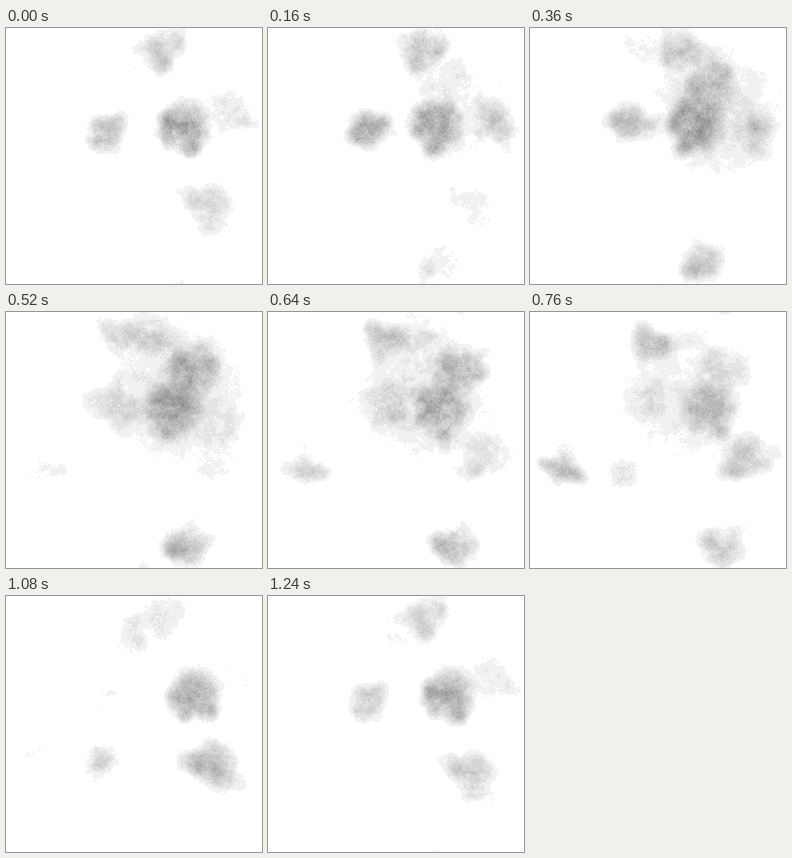
Write an HTML page with a canvas that moves like this. It is 256x256 px and loops after 1280 ms.

```html
<!DOCTYPE html>
<html>
<head>
<meta charset="utf-8">
<style>
  html, body { margin: 0; width: 100%; height: 100%; overflow: hidden; background: #fff; }
  canvas { display: block; width: 256px; height: 256px; }
</style>
</head>
<body>
<canvas id="stage" width="256" height="256"></canvas>
<script>
const SIZE = 256, LOOP = 1280, STEP = 40, SHADE = 14, WISPS = 5;

// Each cloud peaks at a moment, fades over its life and sways by dx, dy.
const clouds = [
  { at: 520, x: 172, y: 82, dx: -20, r: 85, d: 46 },
  { at: 40, life: 1300, x: 177, y: 97, dx: -12, r: 34, d: 108 },
  { at: 500, x: 184, y: 58, dx: 8, r: 34, d: 65 },
  { at: 200, life: 700, x: 152, y: 20, dx: -4, d: 75 },
  { at: 200, x: 98, y: 97, dy: -8, r: 24, d: 88 },
  { at: 640, life: 340, x: 117, y: 92, dy: -8, d: 35 },
  { at: 180, x: 224, y: 93, dy: 12, d: 52 },
  { at: 1000, life: 640, x: 210, y: 160, dx: -5, dy: 18, r: 32, d: 85 },
  { at: 560, life: 640, x: 182, y: 236, dx: 10, d: 70 },
  { at: 780, life: 400, x: 32, y: 158, dx: -8, r: 22, d: 72 },
  { at: 940, life: 300, x: 91, y: 164, r: 20, d: 75 },
  { at: 760, life: 620, x: 118, y: 32, dx: 6, dy: 8, r: 25, d: 58 }
];

const mix = (a, b, f) => a + (b - a) * f;
const ease = f => f * f * (3 - 2 * f);

// Seeded random number from -1 to 1.
function hash(x, y, z) {
  let h = Math.imul(x, 374761393) ^ Math.imul(y, 668265263) ^ Math.imul(z, 1442695041);
  h = Math.imul(h ^ (h >>> 13), 1274126177);
  return ((h ^ (h >>> 16)) >>> 0) / 2147483648 - 1;
}

// Value noise that tiles over the stage and over the loop.
function noise(x, y, phase, cell, beats) {
  const n = SIZE / cell, u = x / cell, v = y / cell, w = phase * beats;
  const i = Math.floor(u), j = Math.floor(v), k = Math.floor(w);
  const fx = ease(u - i), fy = ease(v - j), fz = ease(w - k);
  const i1 = (i + 1) % n, j1 = (j + 1) % n;
  const layer = z => mix(
    mix(hash(i, j, z), hash(i1, j, z), fx),
    mix(hash(i, j1, z), hash(i1, j1, z), fx), fy);
  return mix(layer(k % beats + cell * 100), layer((k + 1) % beats + cell * 100), fz);
}

function turbulence(x, y, phase) {
  let sum = 0;
  for (let cell = 16, beats = 4, gain = 0.5; cell >= 1; cell /= 2, beats *= 2, gain *= 0.8) {
    sum += gain * noise(x, y, phase, cell, beats);
  }
  return sum;
}

function puff(field, cx, cy, r, density) {
  for (let y = Math.ceil(cy - r); y <= cy + r; y++) {
    for (let x = Math.ceil(cx - r); x <= cx + r; x++) {
      const q = 1 - ((x - cx) ** 2 + (y - cy) ** 2) / (r * r);
      if (q > 0) field[(y & 255) * SIZE + (x & 255)] += density * q * q;
    }
  }
}

function addCloud(field, t, { at, life = 520, x, y, dx = 0, dy = 0, r = 28, d }, seed) {
  const age = (t - at + LOOP * 1.5) % LOOP - LOOP / 2;
  if (Math.abs(age) >= life) return;
  const density = d * Math.cos(age / life * Math.PI / 2) ** 2;
  const sway = Math.sin(age / LOOP * 2 * Math.PI);
  const cx = x + dx * sway, cy = y + dy * sway;
  puff(field, cx, cy, r, density);

  for (let i = 0; i < WISPS; i++) {
    const angle = hash(seed, i, 1) * Math.PI + sway * 0.6;
    const reach = r * (0.7 + 0.2 * hash(seed, i, 2));
    puff(field, cx + reach * Math.cos(angle), cy + reach * Math.sin(angle),
      14 + 4 * hash(seed, i, 3), density * 0.3);
  }
}

const ctx = document.getElementById('stage').getContext('2d');
const cache = [];

function render(t) {
  const field = new Float32Array(SIZE * SIZE);
  clouds.forEach((cloud, seed) => addCloud(field, t, cloud, seed + 1));

  const image = ctx.createImageData(SIZE, SIZE);
  image.data.fill(255);
  for (let p = 0; p < field.length; p++) {
    if (field[p] < 4) continue;
    const d = field[p] / Math.cbrt(1 + (field[p] / 135) ** 3);
    const v = d + turbulence(p % SIZE, p >> 8, t / LOOP) * (12 + d * 0.3);
    const grey = 255 - Math.max(0, Math.floor(v / SHADE)) * SHADE;
    image.data.fill(grey, p * 4, p * 4 + 3);
  }
  return image;
}

let shown = -1;
function tick() {
  const step = Math.floor(performance.now() % LOOP / STEP);
  if (step !== shown) {
    cache[step] = cache[step] || render(step * STEP);
    ctx.putImageData(cache[step], 0, 0);
    shown = step;
  }
  requestAnimationFrame(tick);
}
tick();
</script>
</body>
</html>
```
